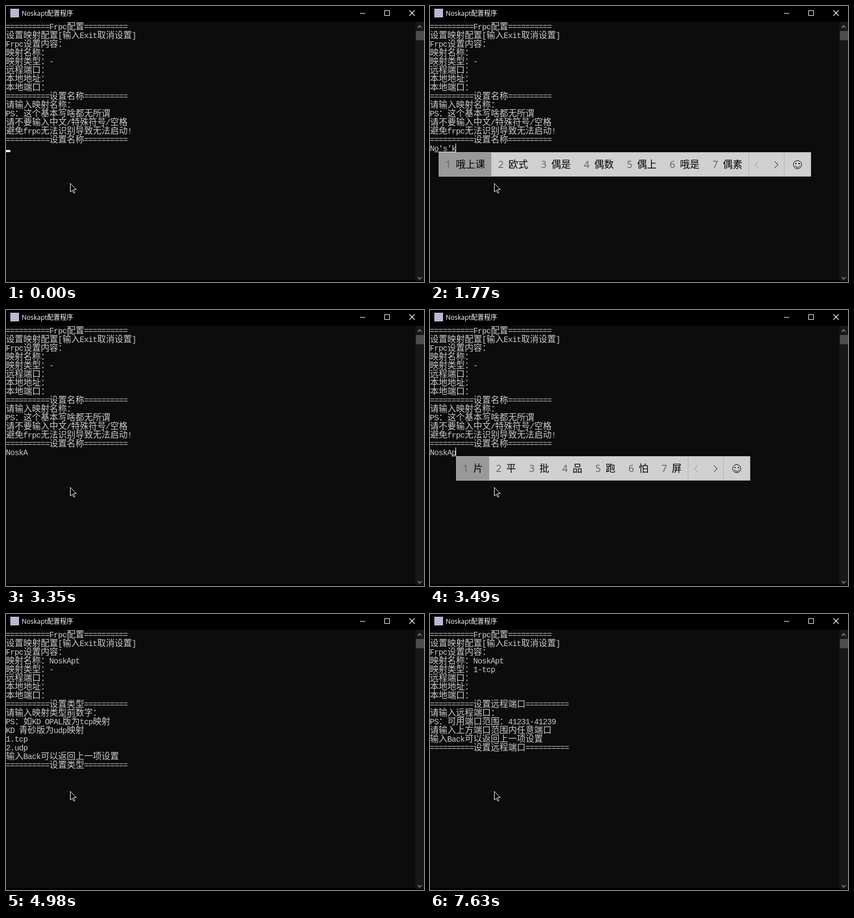
Animation of 770 by 508 pixels, one loop 8 s. Source, as an HTML page with a canvas:

```html
<!DOCTYPE html>
<html lang="zh-CN">
<head>
<meta charset="utf-8">
<title>Noskapt配置程序</title>
<style>
  html, body { margin: 0; width: 100%; height: 100%; overflow: hidden; background: #0c0c0c; }
  canvas { display: block; }
</style>
</head>
<body>
<canvas id="stage" width="770" height="508"></canvas>
<script>
const ctx = document.getElementById('stage').getContext('2d');
const LOOP = 8000, CELL = 8, ROW = 16, TOP = 29;
const WIDE = '"Noto Sans CJK SC", "Noto Sans CJK", sans-serif';
const WIDE_FONT = '300 16px ' + WIDE;
const MONO_FONT = '14.5px "Liberation Mono", monospace';

const rule = title => '='.repeat(10) + title + '='.repeat(10);
const page = (name, type, title, ...body) => [
  rule('Frpc配置'), '设置映射配置[输入Exit取消设置]', 'Frpc设置内容：',
  '映射名称：' + name, '映射类型：' + type, '远程端口：', '本地地址：', '本地端口：',
  rule(title), ...body, rule(title), ''
].join('\n');

const namePage = page('', '-', '设置名称', '请输入映射名称：',
  'PS：这个基本写啥都无所谓', '请不要输入中文/特殊符号/空格', '避免frpc无法识别导致无法启动!');
const typePage = page('NoskApt', '-', '设置类型', '请输入映射类型前数字：',
  'PS：如KD OPAL版为tcp映射', 'KD 青砂版为udp映射', '1.tcp', '2.udp', '输入Back可以返回上一项设置');
const portPage = page('NoskApt', '1-tcp', '设置远程端口', '请输入远程端口：',
  'PS：可用端口范围：41231-41239', '请输入上方端口范围内任意端口', '输入Back可以返回上一项设置');

const words = {
  o: '哦 喔 噢 欧 偶 呕 鸥',
  os: '欧式 偶是 偶数 偶上 哦是 偶素 藕丝',
  osk: '哦上课 欧式 偶是 偶数 偶上 哦是 偶素',
  p: '片 平 批 品 跑 怕 屏',
  pt: '普通 平台 陪同 葡萄 拼图 配套 皮套'
};

// start time, screen text, block cursor shown, unconfirmed letters, candidate words
const steps = [
  [0, namePage, true],
  [190, namePage, false],
  [700, namePage, true],
  [1160, namePage + 'N', true],
  [1260, namePage + 'N', false],
  [1400, namePage + 'N', false, 'o'],
  [1440, namePage + 'N', false, 'o', words.o],
  [1530, namePage + 'N', false, "o's", words.o],
  [1580, namePage + 'N', false, "o's", words.os],
  [1720, namePage + 'N', false, "o's'k", words.os],
  [1770, namePage + 'N', false, "o's'k", words.osk],
  [2050, namePage + 'Nosk', true],
  [2330, namePage + 'Nosk', false],
  [2840, namePage + 'Nosk', true],
  [2980, namePage + 'NoskA', true],
  [3350, namePage + 'NoskA', false],
  [3400, namePage + 'NoskA', false, 'p'],
  [3440, namePage + 'NoskA', false, 'p', words.p],
  [3530, namePage + 'NoskA', false, "p't", words.pt],
  [3770, namePage + 'NoskApt', true],
  [3910, namePage + 'NoskApt\n', true],
  [3950, typePage, true],
  [4980, typePage, false],
  [5490, typePage, true],
  [6000, typePage, false],
  [6280, typePage + '1', true],
  [6560, typePage + '1\n', true],
  [6610, portPage, false],
  [6650, portPage, true],
  [7630, portPage, false]
];

function box(color, x, y, w, h) {
  ctx.fillStyle = color;
  ctx.fillRect(x, y, w, h);
}

function line(color, points, weight = 1) {
  ctx.strokeStyle = color;
  ctx.lineWidth = weight;
  ctx.beginPath();
  for (let i = 0; i < points.length; i += 2) ctx.lineTo(points[i], points[i + 1]);
  ctx.stroke();
}

function write(str, x, y, font, color, align = 'left') {
  ctx.font = font;
  ctx.fillStyle = color;
  ctx.textAlign = align;
  ctx.fillText(str, x, y);
}

// Writes on the console grid: wide characters take two cells. Returns the end x.
function writeCells(str, x, top) {
  for (const ch of str) {
    const wide = ch > '\u00ff', width = wide ? 2 * CELL : CELL;
    write(ch, x + width / 2, top + 14, wide ? WIDE_FONT : MONO_FONT, '#cccccc', 'center');
    x += width;
  }
  return x;
}

function drawWindow() {
  box('#0c0c0c', 0, 0, 770, 508);
  box('#000', 0, 0, 770, 29);
  box('#000', 0, 504, 770, 4);
  box('#b9b7d2', 8, 5, 16, 16);
  write('Noskapt配置程序', 29, 18, '12px "Open Sans", ' + WIDE, '#fff');
  line('#fff', [652, 13.5, 662, 13.5]);
  ctx.strokeRect(697.5, 8.5, 9, 9);
  line('#fff', [743, 8, 753, 18], 1.3);
  line('#fff', [753, 8, 743, 18], 1.3);

  box('#171717', 754, 29, 16, 477);
  box('#4d4d4d', 755, 46, 15, 17);
  line('#8c8c8c', [758.5, 40, 762, 36.5, 765.5, 40], 1.6);
  line('#8c8c8c', [758.5, 499, 762, 502.5, 765.5, 499], 1.6);
}

function drawCandidates(list, left, top) {
  const items = list.split(' ');
  const widths = items.map(item => 43 + 18 * item.length);
  const end = left + widths.reduce((a, b) => a + b);
  box('#d0d0d0', left, top, end + 115 - left, 45);
  box('#999', left, top, widths[0], 45);
  let x = left;
  items.forEach((item, i) => {
    write(i + 1, x + 12.5, top + 29, '18px "Open Sans", sans-serif', '#606060');
    write(item, x + 31.5, top + 29, '18px ' + WIDE, '#000');
    x += widths[i];
  });
  line('#b4b4b4', [end + .5, top, end + .5, top + 45]);
  line('#b4b4b4', [end + 65.5, top, end + 65.5, top + 45]);
  ctx.strokeRect(left + .5, top + .5, end + 114 - left, 44);
  const mid = top + 23;
  line('#909090', [end + 18, mid - 6, end + 12, mid, end + 18, mid + 6]);
  line('#000', [end + 48, mid - 6, end + 54, mid, end + 48, mid + 6]);

  const face = end + 90;
  ctx.beginPath();
  ctx.arc(face, mid, 7.5, 0, 7);
  ctx.moveTo(face + 4, mid + 2);
  ctx.arc(face, mid + 1, 4, .25, Math.PI - .25);
  ctx.stroke();
  box('#000', face - 4, mid - 3, 2, 2);
  box('#000', face + 2, mid - 3, 2, 2);
}

function drawPointer() {
  ctx.beginPath();
  ctx.moveTo(118.5, 326.5);
  for (const [x, y] of [[0, 16], [3.7, 12.5], [6.3, 18], [8.3, 17.2], [6, 11.3], [11, 11.3]])
    ctx.lineTo(118.5 + x, 326.5 + y);
  ctx.closePath();
  ctx.fillStyle = '#000';
  ctx.fill();
  ctx.strokeStyle = '#fff';
  ctx.lineWidth = 1;
  ctx.stroke();
}

function draw(now) {
  const time = now % LOOP;
  const [, text, cursor, typed = '', list] = steps.findLast(step => step[0] <= time);
  drawWindow();

  let x = 0, top = TOP - ROW;
  for (const row of text.split('\n')) x = writeCells(row, 0, top += ROW);
  if (cursor) box('#fff', x, top + 12, CELL, 4);
  if (typed) {
    const end = writeCells(typed, x, top);
    box('#cccccc', x, top + 15, end - x, 1);
    box('#fff', end - 1, top, 1, ROW);
  }
  if (list) drawCandidates(list, x + CELL, top + ROW);
  drawPointer();
  requestAnimationFrame(draw);
}
requestAnimationFrame(draw);
</script>
</body>
</html>
```
